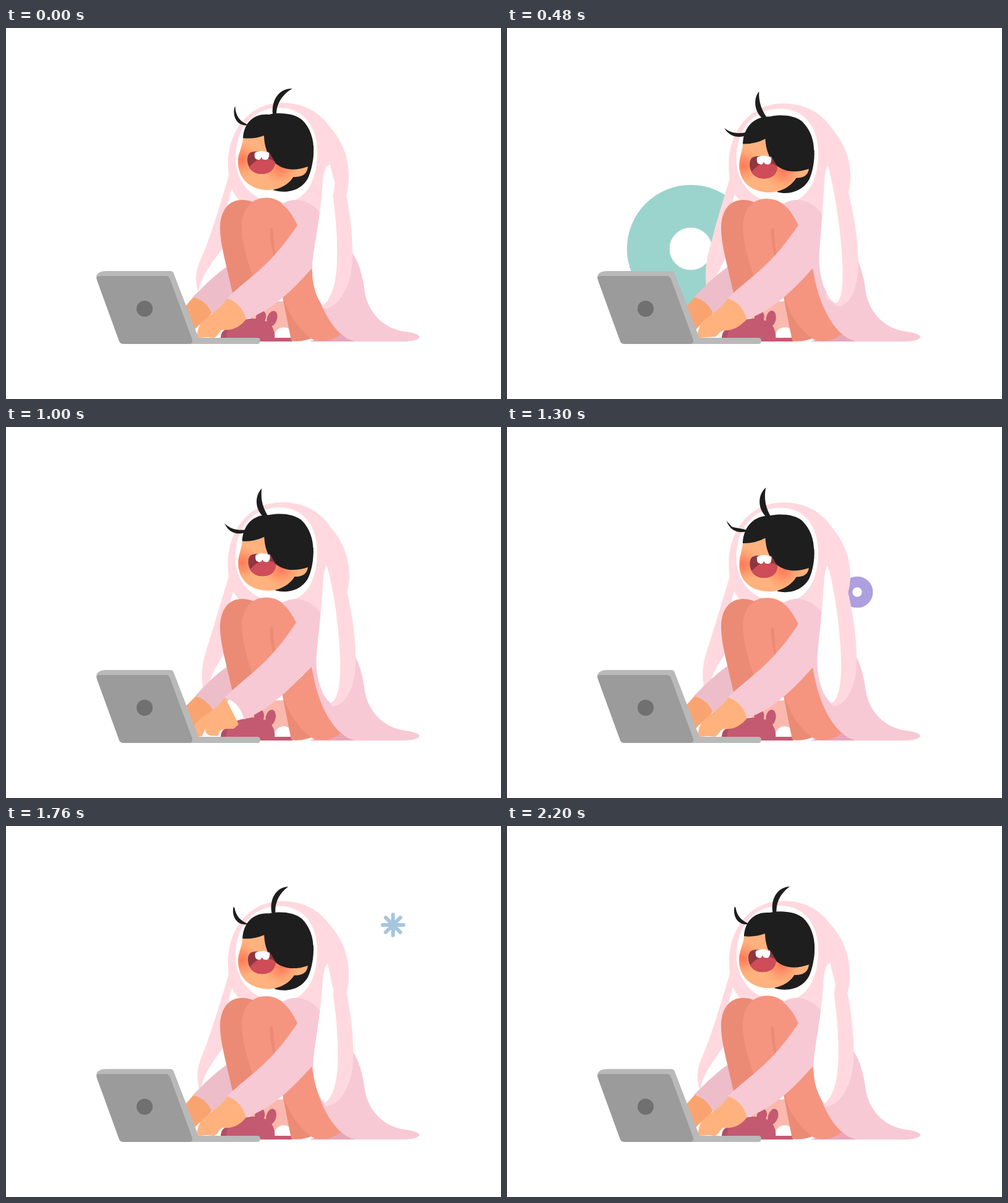
Write an HTML page with a canvas that moves like this. It is 800 px wide and 600 px high and loops after 2220 ms.

```html
<!DOCTYPE html>
<html lang="en">
<head>
<meta charset="utf-8">
<title>Laughing at the laptop</title>
<style>
html, body { margin: 0; width: 100%; height: 100%; overflow: hidden; background: #fff; }
canvas { display: block; }
</style>
</head>
<body>
<canvas id="stage" width="800" height="600"></canvas>
<script>
const ctx = document.getElementById('stage').getContext('2d');
const LOOP = 2220;
const HOOD = '#ffd9df', DRESS = '#f7c9d4', LEG = '#f59580', SHADE = '#eb8b75',
      HAIR = '#1e1e1e', SKIN = '#ffb27d', BUNNY = '#c45a71';

const clamp = x => Math.max(0, Math.min(1, x));
const lerp = (a, b, k) => a + (b - a) * k;
const span = (t, from, to) => clamp((t - from) / (to - from));
const swing = x => (1 - Math.cos(Math.PI * x)) / 2;

// Blend two path strings that share the same commands.
function mix(a, b, k) {
  const ends = b.match(/-?[\d.]+/g);
  let i = 0;
  return a.replace(/-?[\d.]+/g, n => lerp(+n, +ends[i++], k).toFixed(2));
}

function fill(color, a, b, k) {
  const path = new Path2D(b ? mix(a, b, k) : a);
  ctx.fillStyle = color;
  ctx.fill(path);
  return path;
}

function oval(color, x, y, rx, ry, turn = 0) {
  ctx.beginPath();
  ctx.ellipse(x, y, rx, ry, turn, 0, 7);
  ctx.fillStyle = color;
  ctx.fill();
}

// 0 = head thrown back, 1 = head down; two laughs of uneven length.
function headDrop(t) {
  const p = (t + LOOP) % 1110;
  if (p < 380) return swing(p / 380);
  if (p < 575) return 1 - swing((p - 380) / 195);
  if (p < 830) return swing((p - 575) / 255);
  return 1 - swing((p - 830) / 280);
}

function ring(color, x, y, radius, t, start) {
  const outer = radius * (1 - (1 - span(t, start, start + 572)) ** 3);
  const inner = radius * span(t, start + 68, start + 622);
  if (outer - inner < .3) return;
  ctx.strokeStyle = color;
  ctx.lineWidth = outer - inner;
  ctx.beginPath();
  ctx.arc(x, y, (outer + inner) / 2, 0, 7);
  ctx.stroke();
}

function burst(x, y, t) {
  const outer = 22.5 * (1 - (1 - span(t, 1640, 2150)) ** 5);
  const inner = 22.5 * span(t, 1720, 2150);
  if (outer - inner < .3) return;
  ctx.strokeStyle = '#a6c6de';
  ctx.lineWidth = 6 * Math.min(1, (outer - inner) / 6);
  ctx.lineCap = 'round';
  ctx.beginPath();
  for (let i = 0; i < 8; i++) {
    const c = Math.cos(i * Math.PI / 4), s = Math.sin(i * Math.PI / 4);
    ctx.moveTo(x + c * inner, y + s * inner);
    ctx.lineTo(x + c * outer, y + s * outer);
  }
  ctx.stroke();
}

function blush(x, y, r) {
  const g = ctx.createRadialGradient(x, y, 0, x, y, r);
  g.addColorStop(0, 'rgba(255,112,82,.85)');
  g.addColorStop(.4, 'rgba(255,118,86,.55)');
  g.addColorStop(1, 'rgba(255,140,100,0)');
  ctx.fillStyle = g;
  ctx.fillRect(x - r, y - r, 2 * r, 2 * r);
}

function tuft(up, mid, down, k) {
  if (k < .4) fill(HAIR, up, mid, k / .4);
  else fill(HAIR, mid, down, (k - .4) / .6);
}

function leftEar(k) {
  fill(HOOD, 'M364 225C342 300 328 345 314 376C305 396 305 410 310 425L370 400L385 270Z',
             'M362 240C352 270 342 305 334 350C329 375 329 395 330 425L370 400L385 275Z', k);
  fill('#fff', 'M365 259C354 295 350 325 349 357C330 383 316 400 311 425L365 420L385 285Z',
               'M369 276C364 300 360 340 356 380C354 390 350 400 345 425L365 420L385 285Z', k);
}

function hood(k) {
  fill(HOOD, 'M446 121C394 121 359 165 359 220C359 248 365 268 379 280L450 300L509 303C512 280 510 260 517 225L545 205C535 175 520 155 515 150C500 133 478 121 446 121Z',
             'M446 123C394 123 358 167 358 224C358 251 365 271 379 281L450 300L511 305C514 280 513 255 519 222L547 207C537 177 522 157 517 152C502 135 478 123 446 123Z', k);
  fill('#fff', 'M442 129C482 129 503 161 503 202C503 249 483 283 444 283C401 283 371 252 371 209C371 165 396 129 442 129Z',
               'M442 132C482 132 503 164 503 204C503 250 483 284 444 284C400 284 370 254 370 213C370 168 396 132 442 132Z', k);
}

function head(k, lag) {
  fill(HAIR, 'M432 262C450 268 476 265 488 243C494 230 498 210 497 190L450 190Z',
             'M442 269C459 273 479 264 488 249C494 237 497 220 496 205L450 200Z', k);
  const face = fill(SKIN,
    'M384 172C382 195 375 202 375 216C375 245 396 262 424 262C443 262 459 251 464 241C480 241 487 236 488 223L450 170Z',
    'M380 190C379 205 376 215 376 230C376 255 396 270 424 270C446 270 462 258 471 244C480 244 487 240 488 231L450 180Z', k);
  ctx.save();
  ctx.clip(face);
  blush(lerp(381, 383, k), lerp(213, 232, k), 28);
  blush(lerp(443, 449, k), lerp(224, 239, k), 30);
  ctx.restore();
  fill(HAIR, 'M383 178C385 151 402 138 425 140C443 136 466 138 479 149C491 161 498 179 497 200L496 214L488 224C448 239 418 217 417 174Q400 180 383 178Z',
             'M379 198C379 168 400 147 425 147C443 143 464 145 475 154C488 167 496 183 495 207L494 224L488 232C448 244 421 226 418 185Q402 197 379 198Z', k);

  ctx.save();
  ctx.translate(4.5 * k, 16 * k);
  fill('#8e3740', 'M393 203C398 198 412 200 425 200L435 217C434 230 425 236 413 236C398 236 390 225 390 212Q390 207 393 203Z');
  fill('#cf4c59', 'M393 225C402 215 411 209 419 211C428 211 433 215 435 217C434 230 425 236 413 236C403 236 396 231 393 225Z');
  fill('#fff', 'M402 202C407 198 419 198 425 202C426 210 423 214 418 213Q414 213 413 209Q411 214 407 213C402 212 401 208 402 202Z');
  ctx.restore();

  tuft('M432 140C430 116 444 96 466 98C450 106 437 122 438 142Z',
       'M420 147C404 135 402 111 416 98C413 116 417 132 427 147Z',
       'M413 151C397 142 391 121 399 107C400 124 408 140 420 151Z', lag);
  tuft('M371 125C365 141 374 160 393 156C380 152 371 143 371 125Z',
       'M354 153C360 168 372 174 389 169L387 165C375 166 363 163 354 153Z',
       'M348 170C358 180 370 184 385 179L383 173C372 176 360 177 348 170Z', lag);
}

function farArm(a) {
  fill('#f9a470', 'M303 435L290 450L304 489C312 478 324 473 333 460Q324 440 303 435Z',
                  'M307 435L290 452L306 491C316 480 328 474 336 460Q328 441 307 435Z', a);
  fill('#edbdca', 'M302 435C321 416 338 399 357 386L372 430C358 443 343 455 333 462C327 448 317 439 302 435Z',
                  'M306 435C323 416 339 400 357 388L372 430C360 442 347 453 336 462C330 448 321 440 306 435Z', a);
}

function clothesAndLegs(k) {
  fill('#fbb9ae', 'M395 443L450 442L461 503L395 503Z');
  ctx.save();
  ctx.beginPath();
  ctx.rect(420, 470, 40.5, 32);
  ctx.clip();
  oval('#fff', 449, 500, 16, 16);
  ctx.restore();
  fill('#b14f66', 'M347 502C347 493 351 487 360 486L375 502Z');
  fill(BUNNY, 'M356 502C356 484 368 474 385 472C402 467 425 472 430 483C434 490 435 497 434 502Z');
  oval(BUNNY, lerp(412, 403, k), 468, 8, 11, lerp(.3, -.05, k));
  oval(BUNNY, lerp(430, 423, k), 470, 8, 13, lerp(.32, 0, k));
  fill(BUNNY, 'M400 501H463V507H400Z');
  fill('#e8a6bb', 'M490 507L541 494Q549 503 564 507Z');

  fill(SHADE, 'M366 428C355 378 346 350 346 322C347 292 362 278 381 278Q393 278 402 283L425 410Z');
  fill(SHADE, 'M446 430L461 506C475 508 487 505 498 500L490 430Z');
  fill(LEG, 'M400 405C388 370 381 345 381 320C382 290 399 274 421 274.5C446 275 460 295 472 319L440 400Z',
            'M400 405C388 370 382 345 382 320C383 290 400 277 421 278C446 278 459 295 470 317L440 400Z', k);
  fill(SHADE, 'M426.5 326Q429 321 431.5 326L434 358L440 392Q426 355 426.5 326Z');
  fill(LEG, 'M447 433L494 388C500 425 512 467 541 495C530 505 512 509 496 504C475 490 455 462 447 433Z');
}

function nearArm(a) {
  fill(SKIN, 'M358 437C345 458 318 469 313 481C309 490 307 500 312 501L325 500L336 501C342 500 344 490 350 488C367 490 379 483 389 470L396 438Z',
             'M354 437C342 458 310 470 305 482C301 491 302 500 309 501L317 500L322 488L321 501L336 500C343 499 345 489 350 488C368 488 376 481 386 470L394 438Z', a);
  fill(DRESS, 'M446 285C463 273 491 275 510 302L495 388C462 425 431 456 388 471C383 454 374 443 357 437C400 397 425 387 471 319C463 302 455 291 446 285Z',
              'M446 285C463 273 491 275 512 305L494 384C461 423 427 456 385 473C380 455 371 443 353 438C397 395 422 387 469 316C461 301 454 291 446 285Z', a);
}

function rightEar(k) {
  fill(HOOD, 'M502 140C541 170 554 206 554 240Q554 258 550 270C556 300 560 335 560 368C560 415 538 455 512 454L500 420L532 250Z',
             'M502 142C541 172 556 208 556 240Q556 253 553 263C562 300 572 340 572 390C572 428 561 448 548 448C525 446 510 405 510 365L514 250Z', k);
  fill('#fff', 'M517 225C529 255 536 325 535 367C535 405 528 438 511 449C499 432 493 410 495 380C499 345 509 300 512 245Q514 232 517 225Z',
               'M519 222C528 250 544 340 547 400C548 432 547 443 543 443C529 443 510 405 510 365C511 330 511 300 514 240Q515 228 519 222Z', k);
}

function train() {
  fill(DRESS, 'M490 270L540 330L560 364C570 378 577 402 580 428C586 462 612 487 645 491Q668 494 668 500Q665 507 640 507H560L530 500L480 400Z');
}

function laptop() {
  fill('#b9b9b9', 'M146 405C145 397 152 393 162 393H265Q270 393 271 397L311 501H406Q411 501 411 506Q411 511 406 511H290L200 480L150 409Z');
  fill('#9b9b9b', 'M151 401H258Q263 401 265 406L301 504Q302 511 296 511H190Q185 511 183 507L147 408Q145 401 151 401Z');
  oval('#707070', 224, 454, 13, 13);
}

function draw(t) {
  const k = headDrop(t);
  const earDrop = headDrop(t - 20);
  const tuftDrop = headDrop(t - 30);
  const typing = clamp(.5 - .75 * Math.cos(t / 222 * 2 * Math.PI));
  ctx.fillStyle = '#fff';
  ctx.fillRect(0, 0, 800, 600);
  ring('#9bd4cd', 297, 357, 141, t, 278);
  ring('#ae9fdf', 566, 267, 37, t, 1118);
  burst(625.5, 160, t);
  train();
  leftEar(earDrop);
  hood(k);
  head(k, tuftDrop);
  farArm(typing);
  clothesAndLegs(k);
  nearArm(typing);
  rightEar(earDrop);
  laptop();
}

function tick() {
  draw(performance.now() % LOOP);
  requestAnimationFrame(tick);
}
tick();
</script>
</body>
</html>
```
